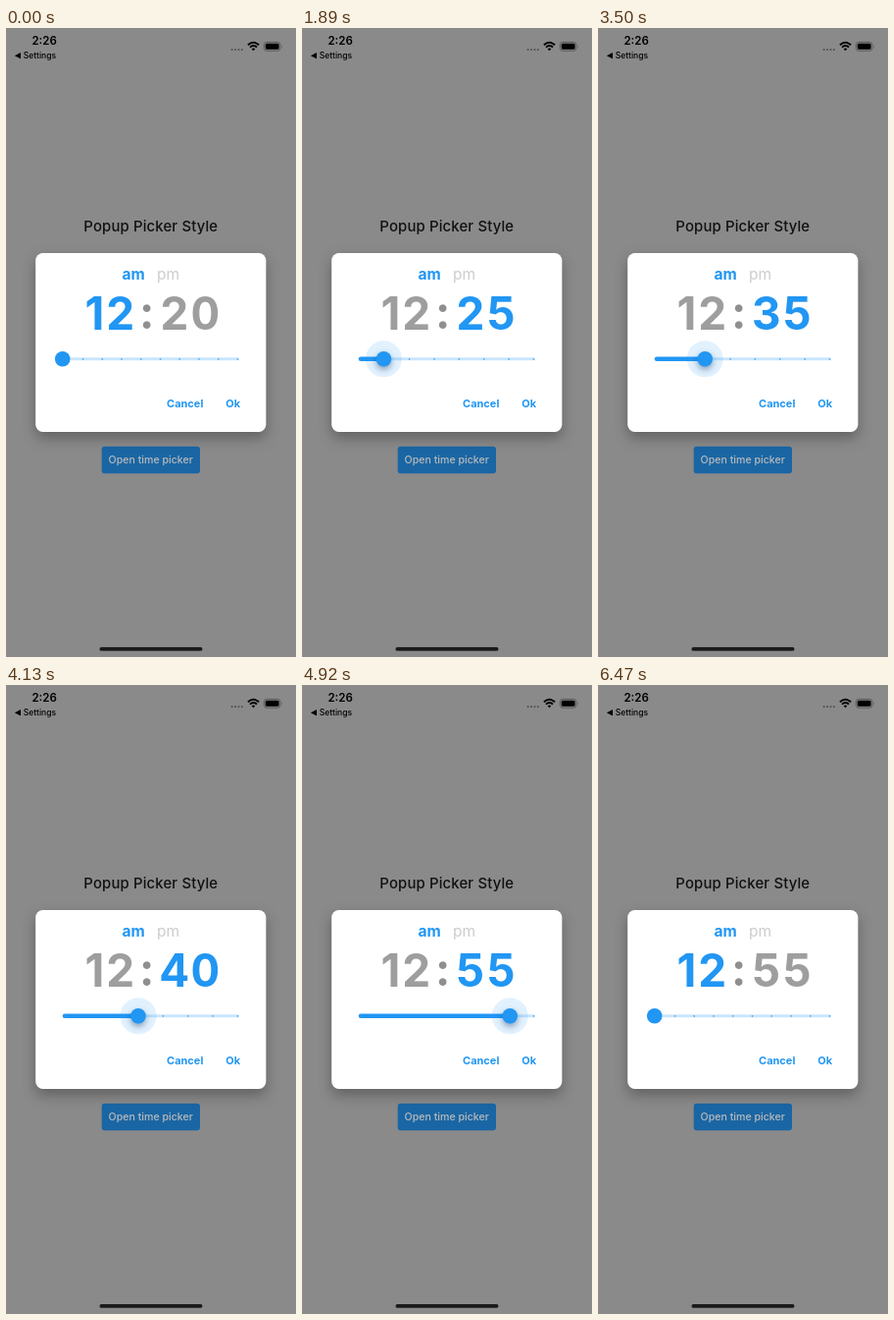
Recreate the animation shown at these times as an HTML page. Size 296 px wide and 640 px high, loop 8 s.

```html
<!DOCTYPE html>
<html lang="en">
<head>
<meta charset="utf-8">
<title>Popup time picker</title>
<style>
  html, body { margin: 0; width: 100%; height: 100%; overflow: hidden; background: #8a8a8a; }
  svg { display: block; width: 296px; height: 640px; font-family: Inter, "Open Sans", sans-serif; }
  .mid { text-anchor: middle; }
  .digits { font-size: 46px; font-weight: 700; letter-spacing: 1.8px; }
  #minute { font-variant-numeric: tabular-nums; }
  #hour { text-anchor: end; }
  .action { font-size: 11px; font-weight: 700; fill: #2196f3; }
  .dialog { filter: drop-shadow(0 6px 7px rgba(0, 0, 0, .3)); }
  .pressed .thumb { filter: drop-shadow(0 3px 3px rgba(0, 40, 90, .42)); }
  .halo { visibility: hidden; }
  .pressed .halo { visibility: visible; }
</style>
</head>
<body>
<svg viewBox="0 0 296 640">
  <rect width="296" height="640" fill="#8a8a8a"/>

  <!-- Status bar -->
  <text class="mid" x="39.1" y="17.2" font-size="11.5" font-weight="600">2:26</text>
  <path d="M8.8 28.2 L15 25.1 V31.3 Z"/>
  <text x="17.7" y="31" font-size="8.5" font-weight="500">Settings</text>
  <path d="M230.7 22 H242" stroke="#505050" stroke-width="2" stroke-linecap="round" stroke-dasharray="0 3.4"/>
  <g fill="none" stroke="#000" stroke-width="1.9">
    <path d="M246.9 17.2 Q252.5 12.3 258.1 17.2"/>
    <path d="M249 19.6 Q252.5 16.6 256 19.6"/>
  </g>
  <path d="M250.7 21.2 Q252.5 19.9 254.3 21.2 L252.5 23.2 Z"/>
  <rect x="263.4" y="14.4" width="16.6" height="8.8" rx="2.6" fill="none" stroke="#555" stroke-width=".9"/>
  <rect x="264.8" y="15.8" width="13.8" height="6" rx="1.4"/>
  <path d="M281 17.2 Q282.4 18.8 281 20.4 Z" fill="#555"/>

  <!-- Page behind the dialog -->
  <text class="mid" x="147.8" y="206.7" font-size="14.9" font-weight="500" letter-spacing=".15" fill="#111">Popup Picker Style</text>
  <rect x="97.7" y="425.7" width="100.3" height="27.6" rx="3" fill="#1a66a4"/>
  <text class="mid" x="147.7" y="443.3" font-size="10.6" font-weight="500" fill="#bababa">Open time picker</text>
  <rect x="95.5" y="630" width="105" height="3.8" rx="1.9" fill="#1a1a1a"/>

  <!-- Dialog -->
  <rect class="dialog" x="30.2" y="229" width="235.2" height="182" rx="7.5" fill="#fff"/>
  <text class="mid" x="130.2" y="255.5" font-size="15.6" font-weight="700" fill="#2196f3">am</text>
  <text class="mid" x="165.6" y="255.5" font-size="15.5" fill="#ccc">pm</text>
  <text id="hour" class="digits" x="133" y="307">12</text>
  <text class="mid digits" x="144.6" y="306" fill="#8f8f8f">:</text>
  <text id="minute" class="mid digits" x="188.6" y="307"></text>
  <text class="mid action" x="182.7" y="386.4">Cancel</text>
  <text class="mid action" x="231.8" y="386.4">Ok</text>

  <g id="slider" fill="#2196f3">
    <rect x="57.7" y="335.2" width="180.3" height="3.1" rx="1.55" fill="#cae6fc"/>
    <path id="ticks" stroke="#2196f3" stroke-opacity=".8" stroke-width="1.7" stroke-linecap="round"/>
    <rect id="active" x="57.7" y="334.4" height="4.7" rx="2.35"/>
    <circle class="halo" id="halo" cy="336.8" r="18.5" fill-opacity=".13"/>
    <circle class="thumb" id="thumb" cy="336.8" r="7.8"/>
  </g>
</svg>
<script>
const LOOP = 8000, STEP = 100;
const TRACK_LEFT = 57.7, TRACK_WIDTH = 180.3, TRACK_Y = 336.8;
const GREY = [158, 158, 158], BLUE = [33, 150, 243];
const HOUR_DIVISIONS = 9, MINUTE_DIVISIONS = 7;

const pickMinutes = 500, pressStart = 1560, pressEnd = 5640, pickHours = 6150;
// Each drag adds one division, five minutes.
const drags = [1790, 2600, 3500, 4130, 4240, 4580, 4920];

const el = id => document.getElementById(id);
const set = (id, name, value) => el(id).setAttribute(name, value);
const dragged = time => drags.filter(drag => drag <= time).length;
const tint = amount =>
  `rgb(${GREY.map((g, i) => Math.round(g + (BLUE[i] - g) * amount))})`;

// Rises from 0 to 1 in a few even jumps.
const fade = (time, start, jumps) =>
  Math.max(0, Math.min(1, (Math.floor((time - start) / STEP) + 1) / jumps));

const tickPath = divisions => Array.from({ length: divisions }, (_, i) =>
  `M${58.8 + 177.7 * (i + 1) / divisions} ${TRACK_Y}h0`).join('');

function draw(time) {
  const highlight = fade(time, pickMinutes, 3) - fade(time, pickHours, 4);
  const hourMode = time < pickMinutes || time >= pickHours + STEP;
  // The thumb trails the digits by one step.
  const division = hourMode ? 0 : dragged(time - STEP);
  const x = TRACK_LEFT + TRACK_WIDTH * division / MINUTE_DIVISIONS;
  const pressed = time >= pressStart && time < pressEnd;

  el('minute').textContent = 20 + 5 * dragged(time);
  set('hour', 'fill', tint(1 - highlight));
  set('minute', 'fill', tint(highlight));
  set('ticks', 'd', tickPath(hourMode ? HOUR_DIVISIONS : MINUTE_DIVISIONS));
  set('active', 'width', x - TRACK_LEFT);
  set('thumb', 'cx', x);
  set('halo', 'cx', x);
  set('slider', 'class', pressed ? 'pressed' : '');
}

const start = performance.now();
function frame() {
  draw((performance.now() - start) % LOOP);
  requestAnimationFrame(frame);
}
frame();
</script>
</body>
</html>
```
